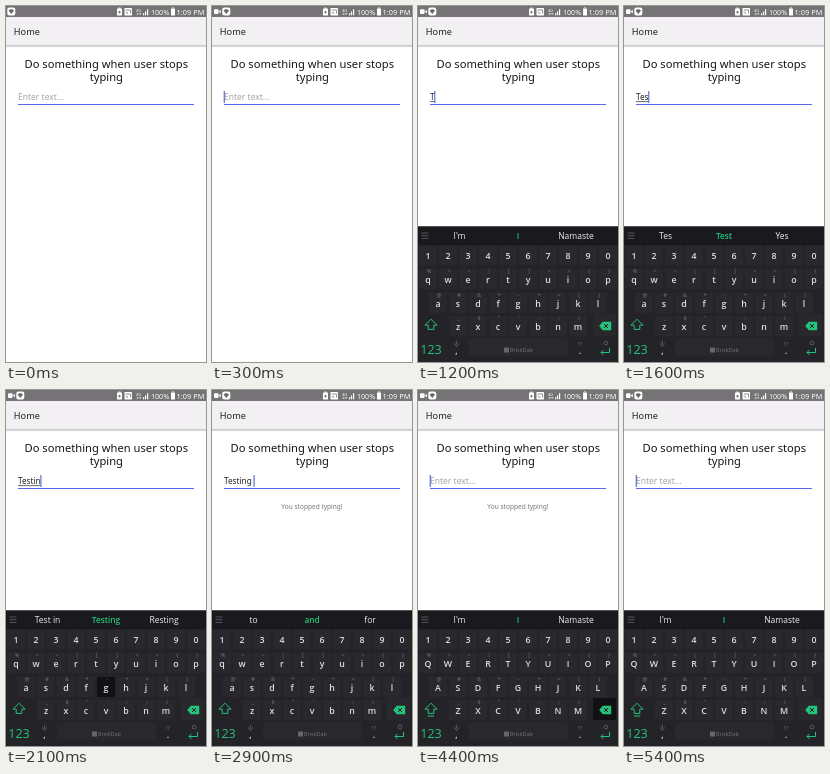
An HTML page that plays this animation: 200 px wide and 356 px high, repeating every 5800 ms.

```html
<!DOCTYPE html>
<html lang="en">
<head>
<meta charset="utf-8">
<title>Typing pause demo</title>
<style>
html, body { margin: 0; width: 100%; height: 100%; overflow: hidden; background: #fff; }
svg { display: block; width: 100%; height: 100%; font-family: "Noto Sans", "Open Sans", sans-serif; }
text { white-space: pre; }
#keyboard { font-family: "Open Sans", "Noto Sans", sans-serif; }
.mid { text-anchor: middle; }
.title { font-size: 11.2px; fill: #161616; }
.field { font-size: 8.2px; }
.status { font-size: 7.4px; font-weight: 500; fill: #fff; }
.key { font-size: 8.8px; font-weight: 600; fill: #dedde0; }
.hint { font-size: 5.6px; fill: #77757a; }
.word { font-size: 8.5px; font-weight: 500; fill: #eceeee; }
.best { font-weight: 600; font-size: 8.3px; fill: #22c47c; }
.line { fill: none; stroke: #22c47c; stroke-width: 1; stroke-linejoin: round; }
.gray { fill: none; stroke: #68666b; stroke-width: .8; }
.tile { fill: #29282c; }
</style>
</head>
<body>
<svg viewBox="0 0 200 356" preserveAspectRatio="none">
  <defs>
    <linearGradient id="shade" x2="0" y2="1">
      <stop stop-color="#b4b4b4"/><stop offset="1" stop-color="#fff"/>
    </linearGradient>
  </defs>
  <rect width="200" height="356" fill="#fff"/>

  <!-- status bar -->
  <rect width="200" height="11" fill="#757375"/>
  <g id="camera" fill="#fff"><rect x="2" y="3.3" width="4.6" height="4.6" rx=".8"/><path d="M6.8 5.6l2-1.8v3.6z"/></g>
  <g id="wifi">
    <rect x="1.3" y="1.6" width="8" height="7.8" rx="2" fill="#fff"/>
    <path d="M2.6 4.4q2.7-2.2 5.4 0L5.3 8z" fill="#666"/>
  </g>
  <g fill="#fff">
    <rect x="111" y="2.6" width="5" height="7" rx=".7"/><rect x="112.4" y="1.6" width="2.2" height="1.2"/>
    <rect x="112.6" y="5" width="1.8" height="2.4" fill="#757375"/>
    <rect x="118.5" y="2" width="7.5" height="7.4" rx=".6"/>
    <path d="M119.8 4h4.8v3.6M119.8 6q1.8.2 2 2" fill="none" stroke="#757375" stroke-width=".8"/>
    <text x="130" y="6" font-size="4">4G</text>
    <path d="M130.5 8.6l1.2-1.5 1.2 1.5zM133 7.2h2.4l-1.2 1.6z"/>
    <path d="M137 9.2h1.2v-2H137zM139 9.2h1.2V5.6H139zM141 9.2h1.2V3.2H141z"/>
    <rect x="165" y="2.4" width="4" height="7.2" rx=".5"/><rect x="166.2" y="1.4" width="1.6" height="1"/>
  </g>
  <text class="status" x="145" y="8.6" style="font-size:7.1px">100%</text>
  <text class="status" x="170.6" y="8.6">1:09 PM</text>

  <!-- page -->
  <rect y="11" width="200" height="28.5" fill="#f2f0f2"/>
  <rect y="39.3" width="200" height="2.4" fill="url(#shade)"/>
  <text x="7.8" y="29" font-size="9.2" fill="#222">Home</text>
  <text class="title mid" x="100.3" y="62">Do something when user stops</text>
  <text class="title mid" x="100.3" y="75.2">typing</text>
  <text id="hint" class="field" x="12" y="94.2" style="font-size:8.5px" fill="#a4a4a4">Enter text...</text>
  <text id="typed" class="field" x="12" y="94.2" fill="#222"></text>
  <rect id="compose" x="12" y="95.3" height=".8" fill="#444"/>
  <rect x="12" y="98" width="176" height="1" fill="#5367e8"/>
  <rect id="caret" y="85" width="1.1" height="12" fill="#4b62dc"/>
  <text id="message" class="mid" x="100" y="119" font-size="6.55" fill="#777">You stopped typing!</text>

  <!-- keyboard -->
  <g id="keyboard">
    <rect y="220.5" width="200" height="135.5" fill="#242327"/>
    <rect y="220.5" width="200" height="19" fill="#1a191d"/>
    <path class="gray" d="M3.5 227h7M3.5 229.7h7M3.5 232.4h7"/>
    <g id="words"></g>
    <g id="tiles"></g>
    <rect id="press" rx="1" fill="#111012"/>
    <g id="keys"></g>
    <path class="line" d="M13 313.2l6 6h-3.2v4.2h-5.6v-4.2H7z"/>
    <path id="shiftBar" class="line" d="M9.8 326h6.4"/>
    <path d="M181.2 320l3.6-4.2h8.4v8.4h-8.4z" fill="#22c47c"/>
    <path d="M186 318l4 4m0-4l-4 4" stroke="#1d1c20" stroke-width="1" fill="none"/>
    <text class="mid" x="13" y="347.8" font-size="12.6" fill="#22c47c">123</text>
    <path class="gray" d="M38.4 334.6v3.4M36.4 337.2q0 2.3 2 2.3t2-2.3M38.4 339.5v1.4"/>
    <text class="key mid" x="38.4" y="348">,</text>
    <rect x="86" y="341.5" width="5" height="5" fill="#68666b"/>
    <text x="92" y="346.3" font-size="5.4" fill="#77757a">BriskDab</text>
    <text class="hint mid" x="162" y="340">!?</text>
    <text class="key mid" x="162" y="348">.</text>
    <path class="line" d="M191.5 342v4.5h-8.5m2.6-2.6l-2.6 2.6 2.6 2.6"/>
    <circle cx="188" cy="337" r="1.9" class="gray"/>
  </g>
</svg>
<script>
const LOOP = 5800;
const SVG = "http://www.w3.org/2000/svg";
const $ = id => document.getElementById(id);

function addText(parent, cls, x, y, value = "") {
  const el = document.createElementNS(SVG, "text");
  el.setAttribute("class", cls + " mid");
  el.setAttribute("x", x);
  el.setAttribute("y", y);
  el.textContent = value;
  return parent.appendChild(el);
}

function place(rect, box) {
  ["x", "y", "width", "height"].forEach((name, i) => rect.setAttribute(name, box[i]));
}

// letters, hints, first column, baseline
const rows = [
  ["1234567890", "", 10, 253.2],
  ["qwertyuiop", "%^~|[]<>{}", 10, 277],
  ["asdfghjkl", "@#&*-+=()", 20, 301],
  ["zxcvbnm", "_$\"':;/", 40, 324],
];
const letters = [];
const spots = {
  back: [175, 308, 23, 22],
  space: [51, 333, 99, 17],
};
for (const [chars, hints, left, y] of rows) {
  [...chars].forEach((ch, i) => {
    const x = left + i * 20;
    if (hints) addText($("keys"), "hint", x + 1, y - 9.7, hints[i]);
    letters.push({ ch, el: addText($("keys"), "key", x, y) });
    spots[ch] = [x - 9, y - 14, 18, 20];
  });
}
for (const box of Object.values(spots)) {
  const tile = document.createElementNS(SVG, "rect");
  tile.setAttribute("class", "tile");
  tile.setAttribute("rx", 1);
  place(tile, box);
  $("tiles").append(tile);
}
const words = [41.5, 100, 158].map((x, i) => addText($("words"), i === 1 ? "word best" : "word", x, 233));

const opening = ["I'm", "I", "Namaste"];
const start = {
  camera: false, keyboard: false, caret: false, message: false,
  caps: true, compose: false, text: "", press: "", words: opening,
};
const steps = [
  [100, { camera: true }],
  [300, { caret: true }],
  [500, { keyboard: true }],
  [800, { caret: false }],
  [1100, { caret: true, press: "t" }],
  [1200, { text: "T", caps: false, compose: true, press: "" }],
  [1300, { press: "e", words: ["T", "The", "This"] }],
  [1400, { text: "Te", press: "" }],
  [1500, { press: "s", words: ["Te", "Tell", "Ten"] }],
  [1600, { text: "Tes", press: "", words: ["Tes", "Test", "Yes"] }],
  [1800, { press: "t" }],
  [1900, { text: "Test", press: "i", words: ["Test", "Testing", "Rest"] }],
  [2000, { text: "Testi", press: "n" }],
  [2100, { text: "Testin", press: "g", words: ["Test in", "Testing", "Resting"] }],
  [2200, { text: "Testing", press: "" }],
  [2300, { press: "space" }],
  [2400, { text: "Testing ", press: "", compose: false, words: ["to", "and", "for"] }],
  [2900, { message: true }],
  [3000, { caret: false }],
  [3400, { caret: true }],
  [3800, { press: "back" }],
  [3900, { caret: false }],
  [4300, { text: "", caret: true, words: opening }],
  [4400, { caps: true }],
  [4600, { press: "" }],
  [4900, { caret: false, message: false }],
  [5400, { caret: true }],
];

const show = (id, on) => $(id).setAttribute("visibility", on ? "inherit" : "hidden");

function draw(time) {
  const s = Object.assign({}, start, ...steps.filter(([at]) => at <= time).map(([, change]) => change));
  for (const id of ["camera", "keyboard", "caret", "message", "compose"]) show(id, s[id]);
  show("hint", !s.text);
  show("shiftBar", s.caps);
  show("press", s.press);
  $("wifi").setAttribute("transform", `translate(${s.camera ? 9 : 0})`);

  $("typed").textContent = s.text;
  const width = s.text ? $("typed").getComputedTextLength() : 0;
  $("compose").setAttribute("width", width);
  $("caret").setAttribute("x", 11.7 + width);

  if (s.press) place($("press"), spots[s.press]);
  words.forEach((el, i) => { el.textContent = s.words[i]; });
  for (const { ch, el } of letters) el.textContent = s.caps ? ch.toUpperCase() : ch;
}

let last = -1;
function tick() {
  const time = performance.now() % LOOP;
  const step = Math.floor(time / 100);
  if (step !== last) draw(time);
  last = step;
  requestAnimationFrame(tick);
}
tick();
</script>
</body>
</html>
```
